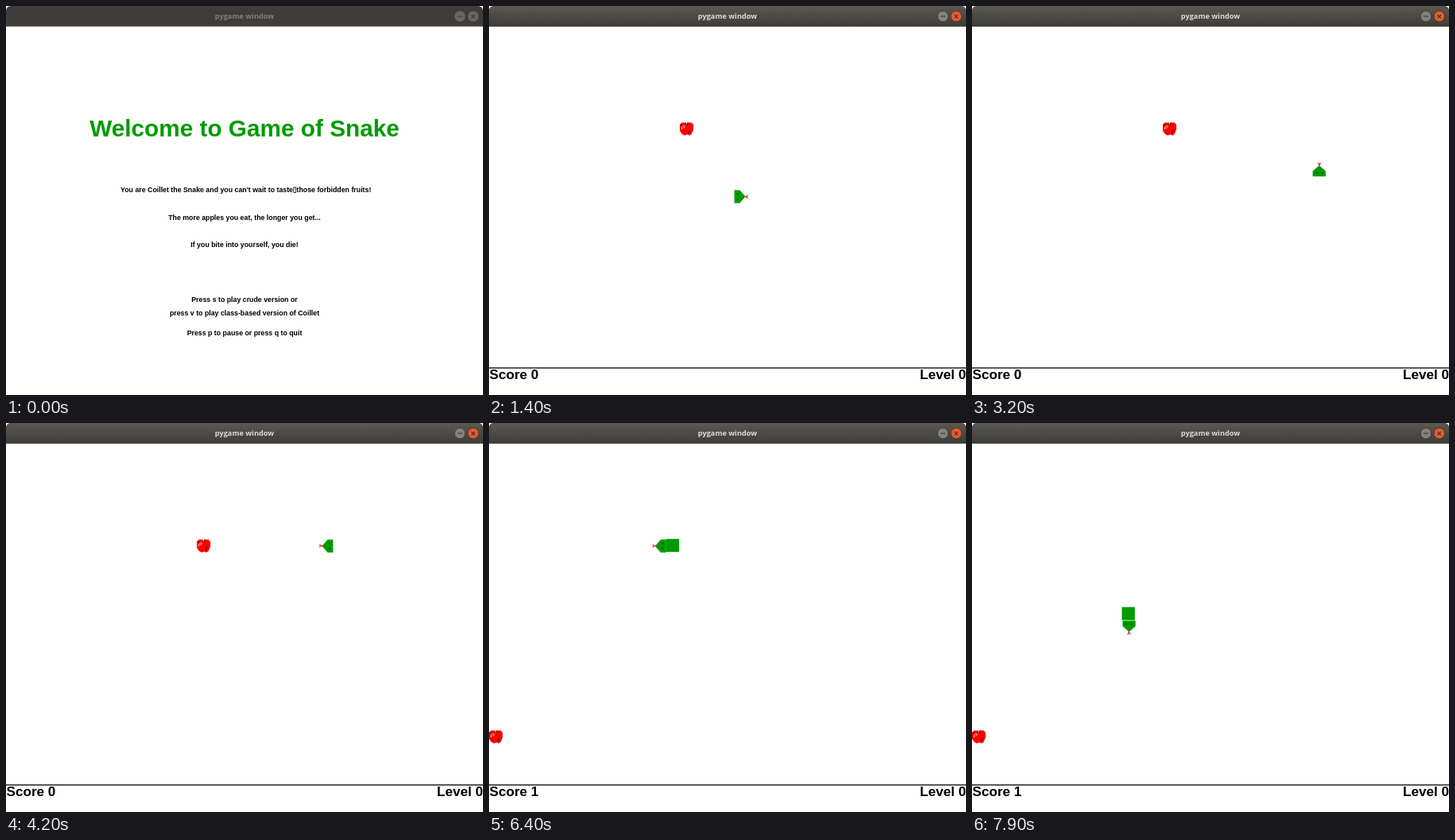
Recreate the animation shown at these times as an HTML page. Size 600 by 489 pixels, loop 8 s.

```html
<!DOCTYPE html>
<html lang="en">
<head>
<meta charset="utf-8">
<title>pygame window</title>
<style>
  html, body { margin: 0; width: 100%; height: 100%; overflow: hidden; background: #fefefe; }
  svg { display: block; width: 100%; height: 100%; }
  text { font-family: "Liberation Sans", Arial, sans-serif; font-weight: 700; }
  .bar { font-family: "Open Sans", "Noto Sans", sans-serif; font-size: 9.2px; }
  .small { font-size: 8.8px; }
  .status { font-size: 17.14px; }
  .mid { text-anchor: middle; }
  .end { text-anchor: end; }
</style>
</head>
<body>
<svg viewBox="0 0 600 489">
  <defs>
    <linearGradient id="shade" x2="0" y2="1">
      <stop offset="0" stop-color="#5b5950"/>
      <stop offset="1" stop-color="#3d3c37"/>
    </linearGradient>
    <path id="frame" d="M0 25.7V6a6 6 0 0 1 6-6H594a6 6 0 0 1 6 6V25.7Z"/>
    <g id="icons" fill="none">
      <path d="M568 13h6"/>
      <path d="M585.5 11l4.4 4.4m0-4.4l-4.4 4.4"/>
    </g>
  </defs>
  <rect width="600" height="489" fill="#fefefe"/>

  <g id="blurred">
    <use href="#frame" fill="#3e3d39"/>
    <text class="bar mid" x="300" y="16.3" fill="#807d77">pygame window</text>
    <circle cx="571" cy="13" r="6.7" fill="#686660"/>
    <circle cx="587.7" cy="13" r="6.7" fill="#686660"/>
    <use href="#icons" stroke="#403f3b" stroke-width="1.1"/>
  </g>
  <g id="focused">
    <use href="#frame" fill="url(#shade)"/>
    <text class="bar mid" x="300" y="16.3" fill="#dfdbd2">pygame window</text>
    <circle cx="571" cy="13" r="6.7" fill="#85827b" stroke="#34332f" stroke-width=".7"/>
    <circle cx="587.7" cy="13" r="6.7" fill="#ea5a30" stroke="#34332f" stroke-width=".7"/>
    <use href="#icons" stroke="#3a3934" stroke-width="1.1"/>
  </g>

  <g id="welcome">
    <text class="mid" x="300" y="164" font-size="29.75" fill="#009b00">Welcome to Game of Snake</text>
    <g class="small mid">
      <text class="end" x="361" y="234.3" style="text-anchor:end">You are Coillet the Snake and you can't wait to taste</text>
      <rect x="361.9" y="228" width="2.8" height="6.4" fill="none" stroke="#000" stroke-width=".8"/>
      <text x="365.5" y="234.3" style="text-anchor:start">those forbidden fruits!</text>
      <text x="300" y="268.7">The more apples you eat, the longer you get...</text>
      <text x="300" y="302.9">If you bite into yourself, you die!</text>
      <text x="300" y="371.5">Press s to play crude version or</text>
      <text x="300" y="388.6">press v to play class-based version of Coillet</text>
      <text x="300" y="414.4">Press p to pause or press q to quit</text>
    </g>
  </g>

  <g id="game">
    <path d="M0 455H600" stroke="#222" stroke-width="1.3"/>
    <text id="score" class="status" x=".5" y="469.2">Score 0</text>
    <text class="status end" x="600" y="469.2">Level 0</text>
    <!-- board units: 20 per cell -->
    <g transform="translate(0 25.71) scale(.85714)">
      <g id="apple">
        <path d="M3 1H7L9.5 3.5 13 1H17L20 4V11L17 18 14 20 11 18.5 7 20 3 17.5 0 13V4Z" fill="#f00"/>
        <path d="M8 3L9 1M10.5 4.5L12 .5M1 5L3 3M13 17L15 12" fill="none" stroke="#400" stroke-width="1.3"/>
        <path d="M3 11V8L7 5M5 10L8 6" fill="none" stroke="#fdd" stroke-width="1"/>
      </g>
      <rect id="body" width="19" height="19" fill="#009b00"/>
      <g id="head">
        <path d="M0 0H8L15 8V11L8 19H0Z" fill="#009b00"/>
        <path d="M4 5h2v2H4ZM4 13h2v2H4Z" fill="#031"/>
        <path d="M14 9.7H17L20 8M17 9.7L20 11.5" fill="none" stroke="#d01818" stroke-width="1.4"/>
      </g>
    </g>
  </g>
</svg>
<script>
const LOOP = 8000, START = 1200, STEP = 200, CELL = 20;
const $ = id => document.getElementById(id);
const DIRS = { R: [1, 0, 0], D: [0, 1, 90], L: [-1, 0, 180], U: [0, -1, 270] };

// Walk the route once, keeping [column, row, heading] for each step
const moves = "R".repeat(8) + "U".repeat(5) + "L".repeat(14) + "D".repeat(6);
const trail = [[17, 12, 0]];
for (const m of moves) {
  const [x, y] = trail[trail.length - 1], [dx, dy, turn] = DIRS[m];
  trail.push([x + dx, y + dy, turn]);
}
const fruit = [14, 7], nextFruit = [0, 21];
const eatStep = trail.findIndex(([x, y]) => x === fruit[0] && y === fruit[1]);

const show = (id, on) => $(id).style.display = on ? "" : "none";
const place = (id, [x, y], turn = 0) =>
  $(id).setAttribute("transform", `translate(${x * CELL} ${y * CELL}) rotate(${turn} 10 10)`);

function render(t) {
  const focus = Math.min(1, Math.max(0, (t - 900) / 200));
  $("focused").style.opacity = focus;
  const playing = t >= START;
  show("welcome", !playing);
  show("game", playing);
  if (!playing) return;

  const step = Math.min(trail.length - 1, Math.floor((t - START) / STEP));
  const eaten = step >= eatStep;
  place("head", trail[step], trail[step][2]);
  show("body", eaten);
  if (eaten) place("body", trail[step - 1]);
  place("apple", eaten ? nextFruit : fruit);
  $("score").textContent = "Score " + (eaten ? 1 : 0);
}

function tick() {
  render(performance.now() % LOOP);
  requestAnimationFrame(tick);
}
tick();
</script>
</body>
</html>
```
